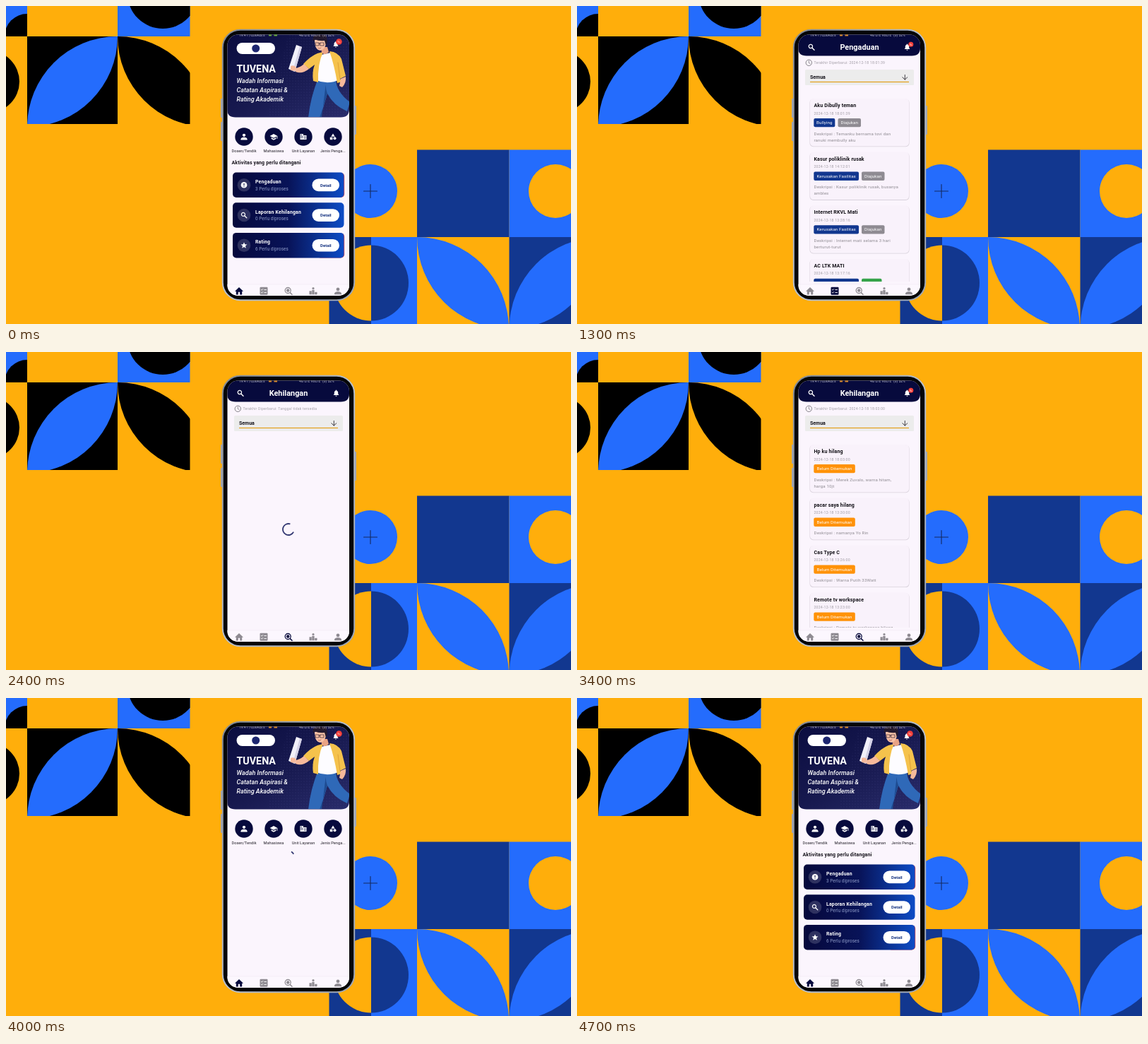
Write an HTML page that moves like this. It is 800 by 450 pixels and loops after 4.8 s.

```html
<!DOCTYPE html>
<html lang="id">
<head>
<meta charset="utf-8">
<title>App preview</title>
<style>
html, body { margin: 0; width: 100%; height: 100%; overflow: hidden; background: #ffae0b; }
svg { display: block; width: 800px; height: 450px; }
text { font-family: Roboto, Arial, sans-serif; white-space: pre; }
</style>
</head>
<body>
<svg id="stage" viewBox="0 0 800 450"></svg>
<script>
const ORANGE = '#ffae0b', BLUE = '#246cfd', DEEP = '#12378f', NAVY = '#070a3d', GREY = '#8f8b92';
const LOOP = 4800, STEP = 100;

const rect = (x, y, w, h, fill, r = 0, extra = '') =>
  `<rect x="${x}" y="${y}" width="${w}" height="${h}" rx="${r}" fill="${fill}" ${extra}/>`;
const circle = (x, y, r, fill, extra = '') => `<circle cx="${x}" cy="${y}" r="${r}" fill="${fill}" ${extra}/>`;
const path = (d, fill, extra = '') => `<path d="${d}" fill="${fill}" ${extra}/>`;
const line = (d, stroke, w = 1) => path(d, 'none', `stroke="${stroke}" stroke-width="${w}" stroke-linecap="round" stroke-linejoin="round"`);
const text = (x, y, size, str, fill, extra = '') =>
  `<text x="${x}" y="${y}" font-size="${size}" fill="${fill}" ${extra}>${str}</text>`;
const group = (content, extra = '') => `<g ${extra}>${content}</g>`;
const at = (x, y, content, scale = 1) => group(content, `transform="translate(${x} ${y}) scale(${scale})"`);
const bold = 'font-weight="700" ', mid = 'text-anchor="middle" ';
const spaced = n => `letter-spacing="${n}" `;

// Lens made of two quarter arcs between opposite corners
const leaf = (x1, y1, x2, y2, r, fill) =>
  path(`M${x1} ${y1}A${r} ${r} 0 0 1 ${x2} ${y2}A${r} ${r} 0 0 1 ${x1} ${y1}`, fill);

const backdrop = () =>
  rect(0, 0, 800, 450, ORANGE) +
  group(
    rect(0, 0, 30, 43, BLUE) + path('M-2 43A32 32 0 0 1 30 11V43Z', '#000') +
    rect(158, 0, 103, 43, BLUE) + circle(222, -18, 50, '#000') +
    circle(-25, 107, 44, '#000') +
    rect(30, 43, 128, 124, '#000') +
    leaf(30, 171, 158, 43, 128, BLUE) + leaf(158, 43, 286, 171, 128, '#000'),
    'clip-path="url(#corner)"') +
  circle(516, 262, 38, BLUE) + line('M506.500 262h19M516 252.500v19', '#14285f', 1.1) +
  rect(582, 203.5, 130.500, 123.500, DEEP) + rect(712.5, 203.5, 88, 123.500, BLUE) + circle(778, 262, 38, ORANGE) +
  rect(457.5, 327, 60, 123, DEEP) + rect(517, 327, 65, 123, BLUE) +
  path('M517 338.500A53 53.500 0 0 0 517 445.500Z', ORANGE) +
  path('M517 338.500A53 53.500 0 0 1 517 445.500Z', DEEP) +
  leaf(582, 327, 712, 457, 130, BLUE) +
  rect(712.5, 327, 88, 123, DEEP) + leaf(712.5, 457, 842, 327, 130, BLUE);

// Icons, each centred on 0,0 in a box of about 10 units
const icon = {
  person: c => circle(0, -2.4, 2.4, c) + path('M-5 5V3.500Q-4 .8 0 .8T5 3.500V5Z', c),
  cap: c => path('M0-4.500 6-1.200 0 2-6-1.200ZM-3.700 1.200 0 3.200 3.700 1.200V3.400L0 5.300-3.700 3.400ZM5-1h1v4H5Z', c),
  building: c => path('M-5-4.500H0V-2.300H5V4.500H-5Z', c) +
    line('M-3.700-2.700h1M-3.700-.6h1M-3.700 1.500h1M-1.500-.6h.8M-1.500 1.500h.8M1.500 0h2M1.500 2.300h2', NAVY, .9),
  shapes: c => path('M0-5 3-.3H-3Z', c) + circle(2.8, 2.6, 2.2, c) + rect(-4.7, .7, 4, 4, c),
  alert: c => circle(0, 0, 4.8, c) + rect(-.6, -2.7, 1.2, 3.3, NAVY) + rect(-.6, 1.5, 1.2, 1.2, NAVY),
  search: c => circle(-1.2, -1.2, 2.8, 'none', `stroke="${c}" stroke-width="1.3"`) + line('M1 1 4.200 4.200', c, 1.5),
  star: c => path('M0-5 1.400-1.600 5-1.400 2.200 1 3.100 4.500 0 2.600-3.100 4.500-2.200 1-5-1.400-1.400-1.600Z', c),
  bell: c => path('M-4 3V2.300L-3 1.300V-1.200Q-2.800-3.600-.8-4V-5H.8V-4Q2.800-3.600 3-1.200V1.300L4 2.300V3ZM-1.200 3.700H1.200Q.8 5 0 5T-1.200 3.700Z', c),
  home: c => path('M0-5.200 6 .4H4.200V5.200H1.200V1.500H-1.200V5.200H-4.200V.4H-6Z', c),
  tasks: c => rect(-5.5, -5.5, 11, 11, c, 1.2) + line('M-3.600-2 -2.700-1.200-1.400-2.700M-3.600 2-2.700 2.800-1.400 1.300M.8-1.800h2.700M.8 2.200h2.700', '#fff', .9),
  find: c => circle(-.8, -.8, 4, 'none', `stroke="${c}" stroke-width="1.3"`) + circle(-.8, -.8, 2.2, c) + line('M2.500 2.500 5 5', c, 1.6),
  ranks: c => rect(-5.5, 0, 3.3, 5, c) + rect(-1.7, -1.5, 3.3, 6.5, c) + rect(2.2, 1.5, 3.3, 3.5, c) + circle(0, -3.8, 1.6, c)
};

const badge = (x, y, r) => circle(x, y, r, '#f4403a') + text(x, y + 1.2, 3.4, '9+', '#fff', mid);

const student = () =>
  // legs, torso, arms, head, rolled paper
  path('M441 105 467 104Q468 122 487 136L483 149Q464 141 455 124L445 158H428Q431 130 441 105Z', '#2f69b8') +
  path('M455 124Q452 116 453 109L447 158H444Z', '#1e4c92') +
  path('M442 70 464 65 473 104Q456 112 439 105Z', '#fdfcff') +
  path('M441 67 449 65Q441 82 442 108L435 106Q433 94 437 83L429 89 421 82Q431 71 441 67Z', '#f5c24c') +
  path('M458 64Q470 65 475 75L481 99 473 103 476 107 469 109Q465 84 458 64Z', '#f5c24c') +
  line('M470 80 473 103', '#d99a35', .8) +
  path('M422 82 429 89Q419 97 410 93L406 88Q414 89 422 82Z', '#f6b99b') +
  path('M474 103 481 100Q482 109 476 115L472 113Z', '#f6b99b') +
  path('M446 58H455L457 65Q452 71 447 66Z', '#e9a385') +
  path('M437 48Q437 62 445 63 453 62 454 47Z', '#f8c1a5') +
  path('M435 50Q433 41 441 41 448 37 454 43 456 52 453 56L451 49Q442 50 438 47Z', '#241a2e') +
  line('M438 52h5v4h-4ZM445 52h5v4h-5ZM443 53h2', '#392636', .7) +
  line('M442 59.500q3 1.500 4-.5', '#a34d42', .7) +
  path('M411 55 419 58 409 93 400 89Z', '#f2f0fa') +
  path('M416 57 419 58 409 93 406 92Z', '#d4d1e6') +
  path('M403 85Q408 83 411 87L409 92 403 91Z', '#f6b99b');

const hero = () =>
  path('M313 40H486V146Q486 157.500 474 157.500H325Q313 157.500 313 146Z', 'url(#night)') +
  path('M400 40H486V146Q486 157.500 474 157.500H370Z', 'url(#dots)') +
  rect(326.5, 52, 54.500, 16, '#fff', 8) + circle(353.7, 60, 5.5, '#1d2670') +
  group(student(), 'clip-path="url(#hero)"') +
  at(467, 54.500, icon.bell('#fff'), .85) + badge(471.5, 50.500, 4.3) +
  text(326.5, 94, 14.300, 'TUVENA', '#fff', bold) +
  ['Wadah Informasi', 'Catatan Aspirasi &amp;', 'Rating Akademik'].map((s, i) =>
    text(326.5, 109.300 + 13 * i, 9, s, '#fff', 'font-style="italic" font-weight="500"')).join('') +
  [['person', 'Dosen/Tendik'], ['cap', 'Mahasiswa'], ['building', 'Unit Layanan'], ['shapes', 'Jenis Penga...']].map(([name, label], i) => {
    const x = 337 + 42 * i;
    return circle(x, 185, 12.700, NAVY) + at(x, 185, icon[name]('#fff'), .9) +
      text(x, 207, 5.7, label, '#24212a', mid);
  }).join('');

const activities = () =>
  text(319.5, 223.700, 7, 'Aktivitas yang perlu ditangani', '#17151c', bold + spaced(.15)) +
  [['alert', 'Pengaduan', 3], ['search', 'Laporan Kehilangan', 0], ['star', 'Rating', 6]].map(([name, label, n], i) =>
    at(0, 42.700 * i,
      (n ? rect(440, 236, 39.200, 35, '#ee4b45', 5) : '') +
      rect(321, 235.500, 157.500, 35.500, 'url(#card)', 5) +
      circle(337, 253.300, 9.3, '#fff', 'opacity=".16"') + at(337, 253.300, icon[name]('#fff'), .9) +
      text(353, 251, 6.9, label, '#fff', bold + spaced(.2)) +
      text(353, 260.700, 6.3, n + ' Perlu diproses', '#8f9cc9', spaced(.1)) +
      rect(433.5, 244.500, 38.500, 17.700, '#fff', 8.8) +
      text(452.8, 255.600, 6, 'Detail', '#12307f', bold + mid))).join('');

const listHeader = title =>
  path('M313 40H486V59Q486 70.500 474 70.500H325Q313 70.500 313 59Z', NAVY) +
  at(332, 58.200, icon.search('#fff'), .95) +
  text(400, 62, 10.900, title, '#fff', bold + mid) +
  at(467.5, 58.300, icon.bell('#fff'), .9) +
  circle(328.3, 80.300, 4.2, 'none', 'stroke="#77737a" stroke-width=".9"') + line('M328.300 77.800V80.500L330 81.500', '#77737a', .8) +
  rect(323, 90, 154, 22, '#ececec', 1.5) + text(330, 103, 7, 'Semua', '#17151c', bold) +
  rect(330, 106.900, 140, 1.2, '#e3a01c') +
  line('M464.300 97.500V104M460.800 100.800 464.300 104.200 467.800 100.800', '#2c2930', .9);

const updated = when => text(335.5, 82.300, 5.1, 'Terakhir Diperbarui: ' + when, '#a29da6', spaced(.22));

const tag = (x, w, label, fill) =>
  rect(x, 28, w, 12.300, fill, 2) + text(x + w / 2, 36.300, 6.2, label, '#fff', mid + spaced(.1));

function cards(items) {
  let y = 131, out = '';
  for (const [title, time, tags, ...lines] of items) {
    const h = lines.length > 1 ? 67.500 : 58.800;
    out += at(0, y,
      rect(329.5, .8, 141, h, '#d9d2dc', 5) + rect(330, 0, 140, h, '#f9f2fb', 5) +
      text(335.5, 12.300, 7, title, '#121016', bold + spaced(.15)) +
      text(335.5, 22.500, 5.2, '2024-12-18 ' + time, '#a19ca5', spaced(.2)) +
      tags + lines.map((s, i) => text(335.5, 51.700 + 8.8 * i, 6.1, s, GREY, spaced(.16))).join(''));
    y += h + 8.1;
  }
  return group(out, 'clip-path="url(#list)"') + badge(472.8, 54.300, 3.5);
}

const facility = tag(335.3, 63.700, 'Kerusakan Fasilitas', DEEP);
const submitted = x => tag(x, 32.500, 'Diajukan', GREY);
const lost = tag(335.3, 58.500, 'Belum Ditemukan', '#ff9208');

const complaints = () => updated('2024-12-18 18:01:39') + cards([
  ['Aku Dibully teman', '18:01:39', tag(335.3, 30, 'Bullying', DEEP) + submitted(369.5), 'Deskripsi : Temanku bernama tovi dan', 'ranuki membully aku'],
  ['Kasur poliklinik rusak', '14:12:01', facility + submitted(403), 'Deskripsi : Kasur poliklinik rusak, busanya', 'ambles'],
  ['Internet RKVL Mati', '13:28:16', facility + submitted(403), 'Deskripsi : Internet mati selama 3 hari', 'berturut-turut'],
  ['AC LTK MATI', '13:17:16', facility + tag(403, 28.500, 'Selesai', '#35a34a'), 'Deskripsi : AC mati', 'total']
]);

const losses = () => updated('2024-12-18 18:03:00') + cards([
  ['Hp ku hilang', '18:03:00', lost, 'Deskripsi : Merek Zuvalo, warna hitam,', 'harga 10jt'],
  ['pacar saya hilang', '13:30:00', lost, 'Deskripsi : namanya Yo Rin'],
  ['Cas Type C', '13:26:00', lost, 'Deskripsi : Warna Putih 33Watt'],
  ['Remote tv workspace', '13:23:00', lost, 'Deskripsi : Remote tv workspace hilang']
]);

const navIcons = ['home', 'tasks', 'find', 'ranks', 'person'];
const navX = i => 330 + 35 * i;
const nav = active =>
  rect(313, 394, 173, 17, '#fcf7fe') + rect(313, 393.700, 173, .5, '#ebe5ee') +
  `<rect id="ripple" x="${navX(active) - 35}" y="394" width="70" height="16" fill="url(#glow)"/>` +
  navIcons.map((name, i) => at(navX(i), 403.300, icon[name](i === active ? NAVY : GREY))).join('');

const statusBar = dots =>
  group(text(330, 43, 5, '19:41 | 0,00KB/s', '#fff') + text(415, 43, 5, '4G LTE VoLTE', '#fff') + text(448, 43, 5, '(0) 52%', '#fff'), 'opacity=".75"') +
  rect(372, 40, 4, 2.5, dots) + rect(379.5, 40, 4.5, 2.5, dots);

const spinner = '<path id="arc" fill="none" stroke="#343973" stroke-width="1.8"/>';

const pages = [
  { title: '', tab: 0, content: activities, empty: '' },
  { title: 'Pengaduan', tab: 1, content: complaints, empty: updated('Tanggal tidak tersedia') },
  { title: 'Kehilangan', tab: 2, content: losses, empty: updated('Tanggal tidak tersedia') }
];

// start of a page, moment its data arrives
const visits = [
  { page: 0, start: -920, ready: -400 },
  { page: 1, start: 350, ready: 900 },
  { page: 2, start: 1890, ready: 2800 },
  { page: 0, start: 3870, ready: 4400 }
];

const clip = (id, shape) => `<clipPath id="${id}">${shape}</clipPath>`;
const stop = (o, c, a = 1) => `<stop offset="${o}" stop-color="${c}" stop-opacity="${a}"/>`;
const defs = `<defs>
  ${clip('corner', rect(0, 0, 260.500, 167, '#000'))}
  ${clip('screen', rect(313.5, 40.500, 172.500, 369.500, '#000', 15))}
  ${clip('hero', rect(395, 40.500, 91, 116.500, '#000', 11))}
  ${clip('list', rect(320, 131, 160, 259, '#000'))}
  <linearGradient id="night" x2="1" y2="1">${stop(0, '#0b0d40') + stop(.5, '#17194f') + stop(1, '#292c6b')}</linearGradient>
  <linearGradient id="card">${stop(0, '#06083c') + stop(.5, '#081358') + stop(1, '#0d4cc6')}</linearGradient>
  <linearGradient id="metal" x2="1" y2="1">${stop(0, '#7f8692') + stop(.5, '#b8bfca') + stop(1, '#9aa3b3')}</linearGradient>
  <radialGradient id="glow">${stop(0, '#cfcad1') + stop(.6, '#d8d3da', .9) + stop(1, '#eee8f0', 0)}</radialGradient>
  <pattern id="dots" width="4" height="4" patternUnits="userSpaceOnUse">${circle(2, 2, .6, '#7378bd', 'opacity=".2"')}</pattern>
</defs>`;

const phone =
  rect(304, 131, 3, 27, '#a3a6ae', 1) + rect(304, 164, 3, 27, '#a3a6ae', 1) + rect(493, 141, 3, 41, '#a3a6ae', 1) +
  rect(306.8, 33.800, 186.400, 382.400, '#050507', 25, 'stroke="url(#metal)" stroke-width="2"') +
  group('', 'id="view" clip-path="url(#screen)"');

const stage = document.getElementById('stage');
stage.innerHTML = defs + backdrop() + phone;
const view = document.getElementById('view');

function ease(x) {
  // cubic curve (.4, 0, .2, 1)
  let lo = 0, hi = 1, u = .5;
  for (let i = 0; i < 20; i++) {
    u = (lo + hi) / 2;
    const bx = 1.2 * u * (1 - u) ** 2 + .6 * u * u * (1 - u) + u ** 3;
    if (bx < x) lo = u; else hi = u;
  }
  return 3 * u * u * (1 - u) + u ** 3;
}

function arcPath(age, cy) {
  const cycle = age % 1333 / 1333, span = 1.5 * Math.PI, r = 8;
  const head = ease(Math.min(1, cycle * 2)) * span;
  const tail = ease(Math.max(0, cycle * 2 - 1)) * span;
  const from = -Math.PI / 2 + tail + age / 2222 * 2 * Math.PI + cycle * Math.PI / 2;
  const to = from + Math.max(.02, head - tail);
  const point = a => `${400 + r * Math.cos(a)} ${cy + r * Math.sin(a)}`;
  return `M${point(from)}A${r} ${r} 0 ${to - from > Math.PI ? 1 : 0} 1 ${point(to)}`;
}

let shown = '';
function draw() {
  const t = Math.floor(performance.now() % LOOP / STEP) * STEP;
  const visit = visits.filter(v => v.start <= t).pop();
  const { title, tab, content, empty } = pages[visit.page];
  const loaded = t >= visit.ready, age = t - visit.start;
  const key = visit.start + '|' + loaded;
  if (key !== shown) {
    shown = key;
    view.innerHTML = rect(313, 40, 174, 371, '#fbf5fd') + (tab ? listHeader(title) : hero()) +
      (loaded ? content() : empty + spinner) + nav(tab) + statusBar(visit.start < 0 ? '#69a83c' : '#d98a2b');
  }
  if (!loaded) document.getElementById('arc').setAttribute('d', arcPath(age, tab ? 251 : 224.500));
  document.getElementById('ripple').setAttribute('opacity', tab ? Math.max(0, 1 - age / 400) : 0);
  requestAnimationFrame(draw);
}
draw();
</script>
</body>
</html>
```
